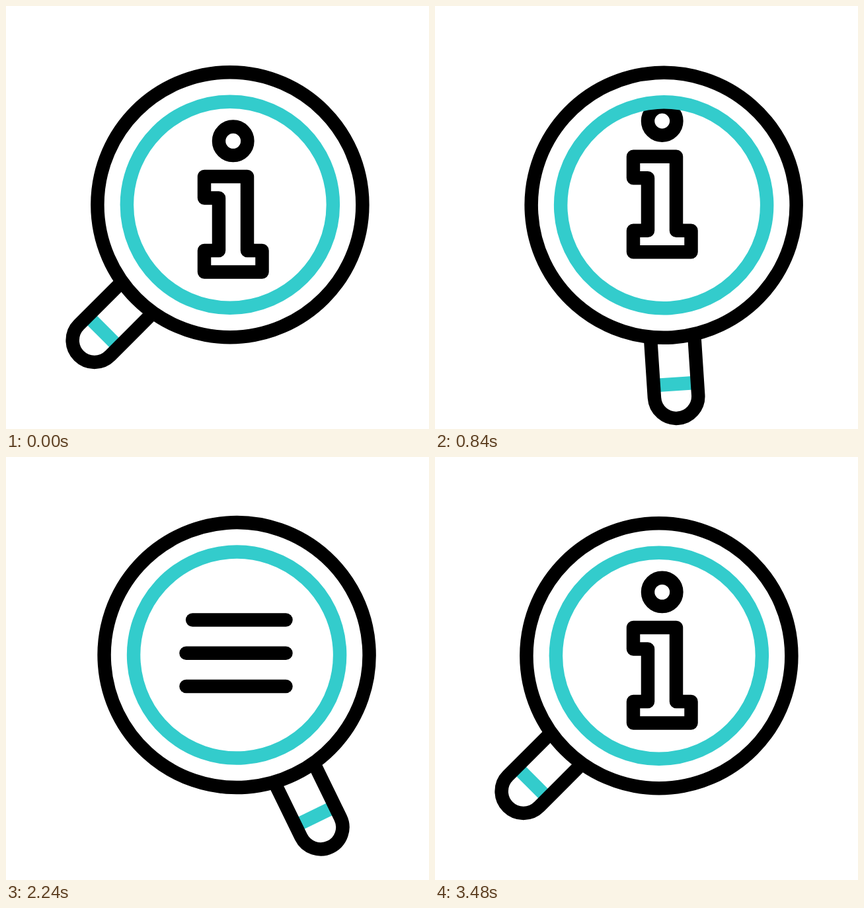
Animation, 640 px wide and 640 px high, one loop 3.6 s. Source, as an HTML page:

```html
<!DOCTYPE html>
<html lang="en">
<head>
<meta charset="utf-8">
<title>Magnifier</title>
<style>
  html, body { margin: 0; width: 100%; height: 100%; overflow: hidden; background: #fff; }
  svg { display: block; width: 100%; height: 100%; }
  .ink, .teal { fill: none; stroke-width: 20.5; }
  .ink { stroke: #000; }
  .teal { stroke: #33cccc; }
</style>
</head>
<body>
<svg viewBox="0 0 640 640">
  <defs>
    <clipPath id="glass"><circle id="hole" cx="345.6" cy="301.5" r="150"/></clipPath>
  </defs>
  <g clip-path="url(#glass)">
    <g id="info" class="ink" stroke-linejoin="round">
      <circle cx="343.7" cy="204.3" r="21.7"/>
      <path d="M300 258H365V370H387.5V402.5H300V370H322V290.5H300Z"/>
    </g>
    <g id="lines" class="ink" stroke-linecap="round">
      <path/><path/><path/>
    </g>
  </g>
  <g id="lens">
    <path class="teal" d="M319 572.7H372"/>
    <path class="ink" d="M312.4 493V591.5A33.2 33.2 0 0 0 378.8 591.5V493"/>
    <circle class="teal" cx="345.6" cy="301.5" r="156"/>
    <circle class="ink" cx="345.6" cy="301.5" r="200.5"/>
  </g>
</svg>
<script>
const LOOP = 3600;
const byId = id => document.getElementById(id);
const info = byId('info'), lens = byId('lens'), hole = byId('hole');
const bars = [...byId('lines').children];

const clamp = v => Math.min(1, Math.max(0, v));
const part = (t, from, to) => clamp((t - from) / (to - from));
const mix = (a, b, k) => a + (b - a) * k;
const sine = u => (1 - Math.cos(Math.PI * u)) / 2;
const outQuad = u => 1 - (1 - u) ** 2;

function bezier(x1, y1, x2, y2) {
  const at = (s, a, b) => 3 * s * (1 - s) ** 2 * a + 3 * s * s * (1 - s) * b + s ** 3;
  return u => {
    if (u <= 0 || u >= 1) return clamp(u);
    let lo = 0, hi = 1;
    for (let i = 0; i < 24; i++) {
      const mid = (lo + hi) / 2;
      if (at(mid, x1, x2) < u) lo = mid; else hi = mid;
    }
    return at(lo, y1, y2);
  };
}
const swing = bezier(0.45, 0, 0.33, 1);
const swingBack = bezier(0.2, 0.22, 0.3, 1);

function lensAngle(t) {
  if (t < 440) return mix(45, 52.6, sine(part(t, 0, 440)));
  if (t < 2000) return mix(52.6, -26, swing(part(t, 440, 1200)));
  return mix(-26, 45, swingBack(part(t, 2765, 3480)));
}

// Vertical offset of the "i": lifts a little, drops out, rises again.
function infoShift(t) {
  if (t < 568) return -67.8 * sine(t / 568);
  if (t < 2000) return -67.8 + 0.000503 * (t - 568) ** 2;
  return 203 * (Math.max(0, 3490 - t) / 630) ** 2;
}

// The three bars are one continuous stroke, drawn and then erased from its start.
function drawBars(t) {
  const head = 3 * outQuad(part(t, 1045, 2115));
  const tail = 3 * outQuad(part(t, 2230, 3256));
  bars.forEach((bar, i) => {
    const a = clamp(tail - i), b = clamp(head - i);
    const y = 246.5 + 50.3 * i;
    bar.setAttribute('d', b > a ? `M${mix(272.5, 423.5, a)} ${y}H${mix(272.5, 423.5, b)}` : '');
  });
}

function draw(t) {
  const turn = `rotate(${lensAngle(t)} 343.2 293)`;
  lens.setAttribute('transform', turn);
  hole.setAttribute('transform', turn);
  info.setAttribute('transform', `translate(0 ${infoShift(t)})`);
  drawBars(t);
}

const start = performance.now();
function tick() {
  draw((performance.now() - start) % LOOP);
  requestAnimationFrame(tick);
}
tick();
</script>
</body>
</html>
```
